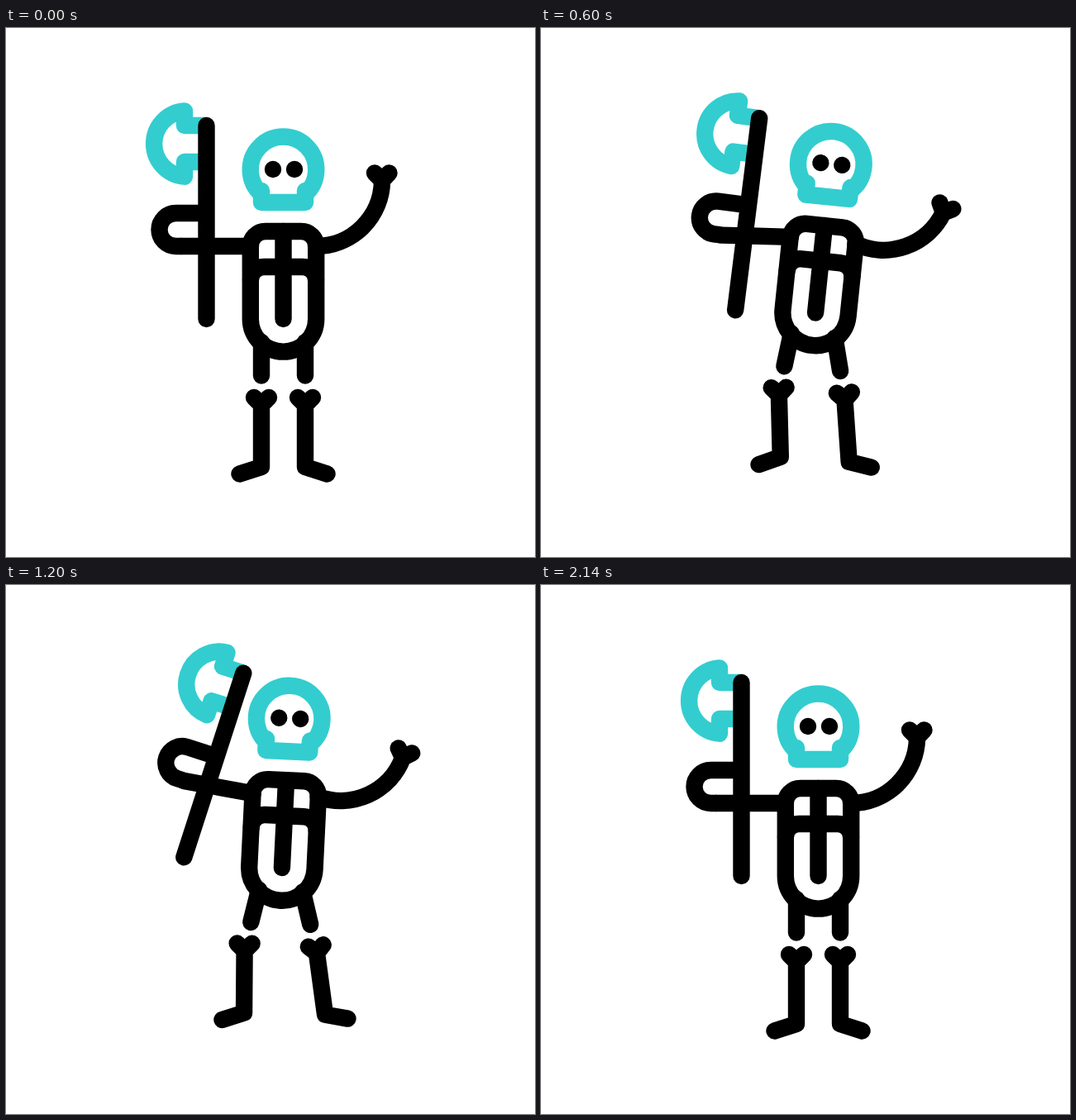
An HTML page that plays this animation: 640x640 px, repeating every 2400 ms.

```html
<!DOCTYPE html>
<html lang="en">
<head>
<meta charset="utf-8">
<title>Dancing skeleton</title>
<style>
  html, body { margin: 0; width: 100%; height: 100%; overflow: hidden; background: #fff; }
  svg { display: block; width: 100%; height: 100%; }
  .line { fill: none; stroke: #000; stroke-width: 20.4; stroke-linecap: round; stroke-linejoin: round; }
  .teal { stroke: #33cdcf; }
</style>
</head>
<body>
<svg viewBox="0 0 640 640">
  <defs>
    <path id="thigh" d="M309 380V420.5"/>
    <path id="shin" d="M300 447L309 456L318 447M309 456V531L282.5 539.5"/>
  </defs>
  <g id="body" class="line">
    <g id="armL">
      <path d="M296 264H212"/>
      <g id="elbow">
        <path class="teal" d="M240 118H216V100.5A39.7 39.7 0 0 0 216 179.7V162H240"/>
        <path d="M212 264H205.5a20 20 0 0 1 0-40H242.5M242.5 118V352"/>
      </g>
    </g>
    <path id="armR" d="M375 264A80 80 0 0 0 455 185M446 175.5L455 184.5L463.5 175.5"/>
    <g id="hipL">
      <use href="#thigh"/>
      <use id="kneeL" href="#shin"/>
    </g>
    <g transform="matrix(-1 0 0 1 671 0)">
      <g id="hipR">
        <use href="#thigh"/>
        <use id="kneeR" href="#shin"/>
      </g>
    </g>
    <path d="M295.8 352V264a18 18 0 0 1 18-18H357.2a18 18 0 0 1 18 18V352a39.7 39.7 0 0 1-79.4 0z"/>
    <path d="M335.5 246V352M296 305a16 16 0 0 1 16-16H359a16 16 0 0 1 16 16"/>
    <g id="head">
      <path class="teal" d="M309 201A39.8 39.8 0 1 1 362 201M309 197V211H362V197"/>
      <path d="M323 171h0M349 171h0"/>
    </g>
  </g>
</svg>
<script>
const LOOP = 2400, STEP = 20;

// Each track is time, value, time, value, ...
const tracks = {
  lift:  [0, 0, 375, -54, 685, 2.5, 970, -54, 1290, 0],
  body:  [0, 0, 365, -15.6, 670, 9, 1000, 10, 1310, 0],
  head:  [0, 0, 375, -26.5, 600, 0, 660, 0, 952, -26.5, 1182, 0],
  armL:  [60, 0, 360, 10, 660, -5.9, 1040, 11.6, 1440, 0],
  elbow: [100, 0, 400, 10, 700, 4.1, 1040, 11.5, 1440, 0],
  armR:  [0, 0, 360, -26, 715, 33.5, 1000, -26.7, 1322, 37.5, 1580, -11.5, 1836, 37.5, 2140, 0],
  hipL:  [0, 0, 380, 33.5, 680, 0.7, 1030, 33.5, 1310, 0],
  hipR:  [0, 0, 380, 45.4, 680, 9.3, 1030, 47.8, 1310, 0],
  kneeL: [0, 0, 375, 24, 610, -13.7, 720, -6, 940, 24, 1200, -13.6, 1320, 0],
  kneeR: [0, 0, 375, 25, 610, -5.5, 720, -6, 970, 25, 1200, -5.5, 1320, 0]
};

const joints = {
  armL: '296 264', elbow: '214 242', armR: '375 264',
  hipL: '309 380', hipR: '309 380', kneeL: '309 452', kneeR: '309 452'
};

function valueAt(name, t) {
  const k = tracks[name];
  if (t <= k[0]) return k[1];
  for (let i = 2; i < k.length; i += 2) {
    if (t < k[i]) {
      const p = (t - k[i - 2]) / (k[i] - k[i - 2]);
      return k[i - 1] + (k[i + 1] - k[i - 1]) * (1 - Math.cos(Math.PI * p)) / 2;
    }
  }
  return k[k.length - 1];
}

function place(id, transform) {
  document.getElementById(id).setAttribute('transform', transform);
}

function draw(now) {
  const t = Math.floor(now % LOOP / STEP) * STEP;
  place('body', `translate(0 ${valueAt('lift', t)}) rotate(${valueAt('body', t)} 335.5 319)`);
  place('head', `translate(0 ${valueAt('head', t)})`);
  for (const id in joints) place(id, `rotate(${valueAt(id, t)} ${joints[id]})`);
}

const start = performance.now();
function frame() {
  draw(performance.now() - start);
  requestAnimationFrame(frame);
}
frame();
</script>
</body>
</html>
```
